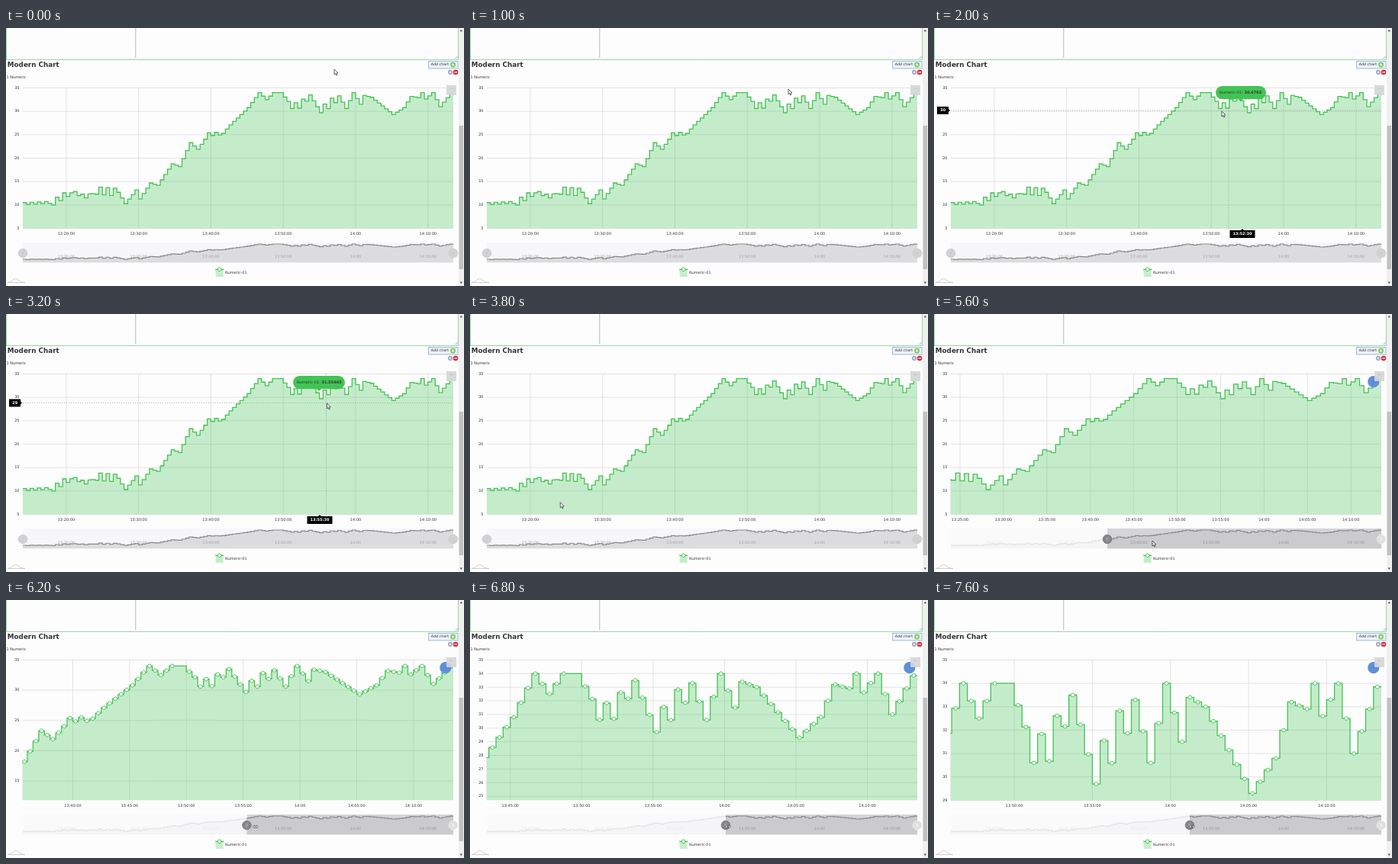
An HTML page with a canvas for the animation above (8000 ms loop, 600x338 px).

```html
<!DOCTYPE html>
<html lang="en">
<head>
<meta charset="utf-8">
<title>Modern Chart</title>
<style>
  html, body { margin: 0; width: 100%; height: 100%; overflow: hidden; background: #fdfdfd; }
  canvas { display: block; width: 600px; height: 338px; }
</style>
</head>
<body>
<canvas id="stage" width="600" height="338"></canvas>
<script>
const ctx = document.getElementById('stage').getContext('2d');
const LOOP = 8000, STEP = 200, DRAG_START = 5200;
const LEFT = 22, RIGHT = 586, TOP = 78.5, BOTTOM = 262.5, Y_MAX = 35;
const START = 14, SPAN = 59.5, COUNT = 119; // minutes after 13:00, one reading per half minute
const GREEN = '#43c353', TEXT = '#333';

// Linear interpolation between keys [position, value, ...]
function track(keys, at) {
  if (at <= keys[0][0]) return keys[0].slice(1);
  const k = keys.findIndex(key => key[0] > at);
  if (k < 0) return keys[keys.length - 1].slice(1);
  const a = keys[k - 1], b = keys[k], p = (at - a[0]) / (b[0] - a[0]);
  return a.slice(1).map((v, i) => v + (b[i + 1] - v) * p);
}

// Turning points of the curve: [index, value, zigzag up to the next point]
const turns = [
  [0, 10.3, -0.2], [8, 10.6, 0.6], [13, 12.9, -0.3], [17, 11.7, -0.2], [20, 13.1, 0.8], [26, 12.7], [28, 10.3],
  [31, 13.2], [32, 11.3], [35, 14.7], [37, 14.2], [41, 18.8], [43, 18.2], [46, 23.3], [48, 21.9],
  [51, 25.1, 0.3], [55, 25.3], [57, 27.1], [62, 30.8], [65, 34], [67, 32.5], [69, 34], [71, 34],
  [74, 31.2, 0.6], [76, 31.2763, 0.6], [79, 33.5], [82, 29.7], [83, 30.75465, 0.8], [87, 33.3], [89, 30.6],
  [91, 34], [93, 31.5], [94, 33.4], [96, 33], [102, 29.3], [105, 30.8], [107, 33.2], [109, 32.9],
  [110, 34], [111, 32.6], [113, 34], [115, 31], [118, 33.85]
];
const data = Array.from({ length: COUNT }, (_, i) => {
  const zigzag = turns.filter(turn => turn[0] <= i).pop()[2] || 0;
  return Number((track(turns, i)[0] + (i % 2 ? zigzag : -zigzag)).toFixed(5));
});

const mouseKeys = [[600, 430, 54], [1400, 404, 106], [2000, 377, 109], [2600, 411, 111], [3000, 419.5, 116.5],
  [3200, 420.5, 117], [4000, 17.5, 290], [5000, 17.5, 290], [5600, 286, 297], [6200, 327, 297], [6600, 338, 297]];
const viewKeys = [[5000, START, 5], [5600, 23.94, 5], [6200, 35.6, 11.8], [7000, 45.94, 29]];
const mouse = t => track(mouseKeys, t);

function rect(x, y, w, h, fill, stroke) {
  if (fill) { ctx.fillStyle = fill; ctx.fillRect(x, y, w, h); }
  if (stroke) { ctx.strokeStyle = stroke; ctx.lineWidth = 1; ctx.strokeRect(x, y, w, h); }
}
function line(points, color, width = 1) {
  ctx.beginPath();
  points.forEach(([x, y]) => ctx.lineTo(x, y));
  ctx.strokeStyle = color;
  ctx.lineWidth = width;
  ctx.stroke();
}
function polygon(points, fill) {
  ctx.beginPath();
  points.forEach(([x, y]) => ctx.lineTo(x, y));
  ctx.closePath();
  ctx.fillStyle = fill;
  ctx.fill();
}
function circle(x, y, r, fill, stroke, width = 1) {
  ctx.beginPath();
  ctx.arc(x, y, r, 0, 7);
  ctx.fillStyle = fill;
  ctx.fill();
  if (stroke) { ctx.strokeStyle = stroke; ctx.lineWidth = width; ctx.stroke(); }
}
function text(str, x, y, { size = 5, color = TEXT, align = 'left', bold = false } = {}) {
  ctx.font = `${bold ? 'bold ' : ''}${size}px "DejaVu Sans", sans-serif`;
  ctx.fillStyle = color;
  ctx.textAlign = align;
  ctx.textBaseline = 'middle';
  ctx.fillText(str, x, y);
}
function clipped(x, y, w, h, draw) {
  ctx.save();
  ctx.beginPath();
  ctx.rect(x, y, w, h);
  ctx.clip();
  draw();
  ctx.restore();
}

function clock(minutes) {
  const two = n => String(Math.floor(n)).padStart(2, '0');
  return `${13 + Math.floor(minutes / 60)}:${two(minutes % 60)}:${two(minutes * 60 % 60)}`;
}
const tickLabel = minutes => minutes === 60 ? '14:00' : clock(minutes);
const bandAt = x => Math.floor((x - LEFT) / (RIGHT - LEFT) * COUNT);
const stairs = (toX, toY) =>
  data.flatMap((v, i) => [0, 0.5].map(d => [toX(START + i / 2 + d), toY(v)]));

function drawPage() {
  rect(0, 0, 600, 338, '#fdfdfd');
  line([[0.5, 0], [0.5, 41.5], [592.5, 41.5], [592.5, 0]], '#9bd89f');
  line([[169.8, 0], [169.8, 39.5]], '#b3bbb3');
  for (const d of [2, 4]) line([[592 - d, 40.5], [592, 40.5 - d]], '#8ba3c4', 0.7);

  rect(593, 0, 7, 338, '#f0f0f0');
  rect(593.5, 128, 5.5, 188, '#c1c1c1');
  polygon([[594.5, 4.5], [596.3, 2], [598, 4.5]], '#555');
  polygon([[594.5, 332.5], [596.3, 335], [598, 332.5]], '#555');

  text('Modern Chart', 1.8, 48.3, { size: 8.8, bold: true });
  text('1 Numeric', 0.5, 65);
  rect(553.5, 43.5, 38.5, 9.5, '#eef2fa', '#9db9dc');
  text('Add chart', 556.8, 48, { size: 4.8 });
  circle(585.5, 48.2, 3.4, '#74cb4b');
  line([[583.5, 48.2], [587.5, 48.2]], '#fff');
  line([[585.5, 46.2], [585.5, 50.2]], '#fff');
  circle(582, 58, 2.4, '#d8dfea', '#8797b0', 1.1);
  circle(589, 58, 3.3, '#dc2836');
  line([[587, 58], [591, 58]], '#fff', 1.2);

  ctx.beginPath();
  ctx.moveTo(2, 333.5);
  ctx.bezierCurveTo(9, 333, 8, 328.5, 12.5, 328.5);
  ctx.bezierCurveTo(17, 328.5, 16, 333, 25, 333.5);
  ctx.closePath();
  ctx.strokeStyle = '#c4c4c4';
  ctx.lineWidth = 0.8;
  ctx.stroke();

  rect(274.7, 316, 10, 10, '#c7eecb');
  line([[274.2, 316.3], [285.2, 316.3]], GREEN, 1.3);
  circle(279.7, 316.3, 2.3, '#fff', GREEN);
  text('Numeric-01', 287, 321, { size: 4.9 });
}

function drawChart(t) {
  const [from, yMin] = track(viewKeys, t);
  const span = START + SPAN - from;
  const toX = m => LEFT + (m - from) / span * (RIGHT - LEFT);
  const toY = v => TOP + (Y_MAX - v) / (Y_MAX - yMin) * (BOTTOM - TOP);
  const xStep = span > 55 ? 10 : 5;
  const yStep = yMin > 20 ? 1 : 5;

  for (let v = Y_MAX; v >= yMin; v -= yStep) {
    line([[LEFT, toY(v)], [RIGHT, toY(v)]], '#dcdcdc', 0.8);
    text(v, 17.5, toY(v), { align: 'right' });
  }
  for (let m = Math.ceil(from / xStep) * xStep; m < START + SPAN; m += xStep) {
    line([[toX(m), TOP], [toX(m), BOTTOM]], '#dcdcdc', 0.8);
    text(tickLabel(m), toX(m), 269.3, { align: 'center' });
  }

  const steps = stairs(toX, toY);
  clipped(LEFT - 0.5, 70, RIGHT - LEFT + 1, BOTTOM - 70, () => {
    polygon([[steps[0][0], BOTTOM], ...steps, [RIGHT, BOTTOM]], 'rgba(67,195,83,.3)');
    line(steps, GREEN, 1.3);
  });
  if (span < 40) data.forEach((v, i) => {
    const x = toX(START + i / 2 + 0.25);
    if (x > LEFT && v !== data[i - 1]) circle(x, toY(v), 2.4, '#fff', GREEN, 0.9);
  });

  if (t >= DRAG_START) {
    circle(575.8, 88.7, 7.6, '#5f8fdb');
    line([[575.8, 88.7], [581, 85.5]], '#4775bd', 0.8);
  }
  rect(577, 75, 13, 13, 'rgba(214,214,217,.92)');
  text('...', 583.5, 78.5, { align: 'center', color: '#8a8a8a' });
}

function drawSlider(t) {
  const top = 281, height = 26.5, base = top + height;
  const handle = Math.max(LEFT, mouse(t - 125)[0] - 3);
  const dragging = t >= DRAG_START;
  const start = dragging ? handle : LEFT;
  const toX = m => LEFT + (m - START) / SPAN * (RIGHT - LEFT);
  const curve = stairs(toX, v => 283 + (34 - v) * 0.85);

  function part(x, right, back, area, stroke, label) {
    clipped(x, top, right - x, height, () => {
      rect(x, top, right - x, height, back);
      polygon([[LEFT, base], ...curve, [RIGHT, base]], area);
      line(curve, stroke, 1.2);
      for (let m = 20; m <= 70; m += 10)
        text(tickLabel(m), toX(m), 300, { align: 'center', color: label });
    });
  }
  function grip(x, fill, bars, ring) {
    circle(x, 295, 5.8, fill, ring, 0.8);
    for (const d of [-1, 1]) line([[x + d, 292.5], [x + d, 297.5]], bars, 0.6);
  }
  part(LEFT, start, '#fafafb', '#f5f5f7', '#e3e3e5', '#e6e6e8');
  if (dragging) {
    part(start, RIGHT, '#d5d5d7', '#cbcbcd', '#8b8b8d', '#969698');
    grip(RIGHT, '#dfdfe1', '#fff', '#f2f2f3');
    grip(start, '#858587', '#ccc', '#777');
  } else {
    part(LEFT, RIGHT, '#f7f7f9', '#dcdcdf', '#8b8b8d', '#a2a2a4');
    for (const x of [RIGHT, LEFT]) grip(x, '#d3d3d6', '#c6c6c9', '#c8c8cb');
  }
}

// Crosshair, tags and tooltip trail the mouse by different delays
function drawPointer(t) {
  if (t < 1200 || t > 3400) return;
  const [x, y] = mouse(t - 200);
  const [tagX, tagY] = mouse(t - 600);
  const white = { color: '#fff', align: 'center', bold: true };

  ctx.setLineDash([1.2, 1.8]);
  line([[LEFT, y], [RIGHT, y]], '#999', 0.7);
  line([[x, TOP], [x, BOTTOM]], '#888', 0.7);
  ctx.setLineDash([]);

  const level = Y_MAX - (y - TOP) / (BOTTOM - TOP) * 30;
  rect(4, y - 5, 15, 10, '#000');
  polygon([[19, y - 2], [21, y], [19, y + 2]], '#000');
  text(Math.round(level), 11.7, y, white);

  rect(tagX - 16.5, 265, 33, 10, '#000');
  polygon([[tagX - 2, 265], [tagX, 263], [tagX + 2, 265]], '#000');
  text(clock(START + bandAt(mouse(t - 300)[0]) / 2), tagX, 270, white);

  const value = String(data[bandAt(x)]), name = 'Numeric-01: ';
  const width = Math.max(66, 36 + value.length * 4);
  const tipX = tagX - 35, tipY = tagY - 30;
  ctx.beginPath();
  ctx.roundRect(tipX, tipY, width, 17.2, 8.6);
  ctx.fillStyle = '#42c455';
  ctx.fill();
  const middle = tipX + width / 2;
  polygon([[middle - 3, tipY + 17], [middle, tipY + 20], [middle + 3, tipY + 17]], '#42c455');
  text(name, tipX + 5, tipY + 8.6);
  text(value, tipX + 5 + ctx.measureText(name).width, tipY + 8.6, { bold: true });
}

function drawCursor(t) {
  ctx.save();
  ctx.translate(...mouse(t));
  if (t >= 5800) {
    for (const d of [-1, 1]) {
      const arrow = [[d, -2], [d * 3.6, 0], [d, 2], [d, -2]];
      polygon(arrow, '#fff');
      line(arrow, '#333', 0.6);
    }
  } else {
    const arrow = [[0, 0], [0, 7], [1.6, 5.6], [2.7, 8], [3.8, 7.5], [2.8, 5.2], [4.9, 5], [0, 0]];
    polygon(arrow, '#fff');
    line(arrow, '#222', 0.7);
  }
  ctx.restore();
}

function frame(now) {
  const t = Math.floor(now % LOOP / STEP) * STEP;
  drawPage();
  drawChart(t);
  drawSlider(t);
  drawPointer(t);
  drawCursor(t);
  requestAnimationFrame(frame);
}
requestAnimationFrame(frame);
</script>
</body>
</html>
```
